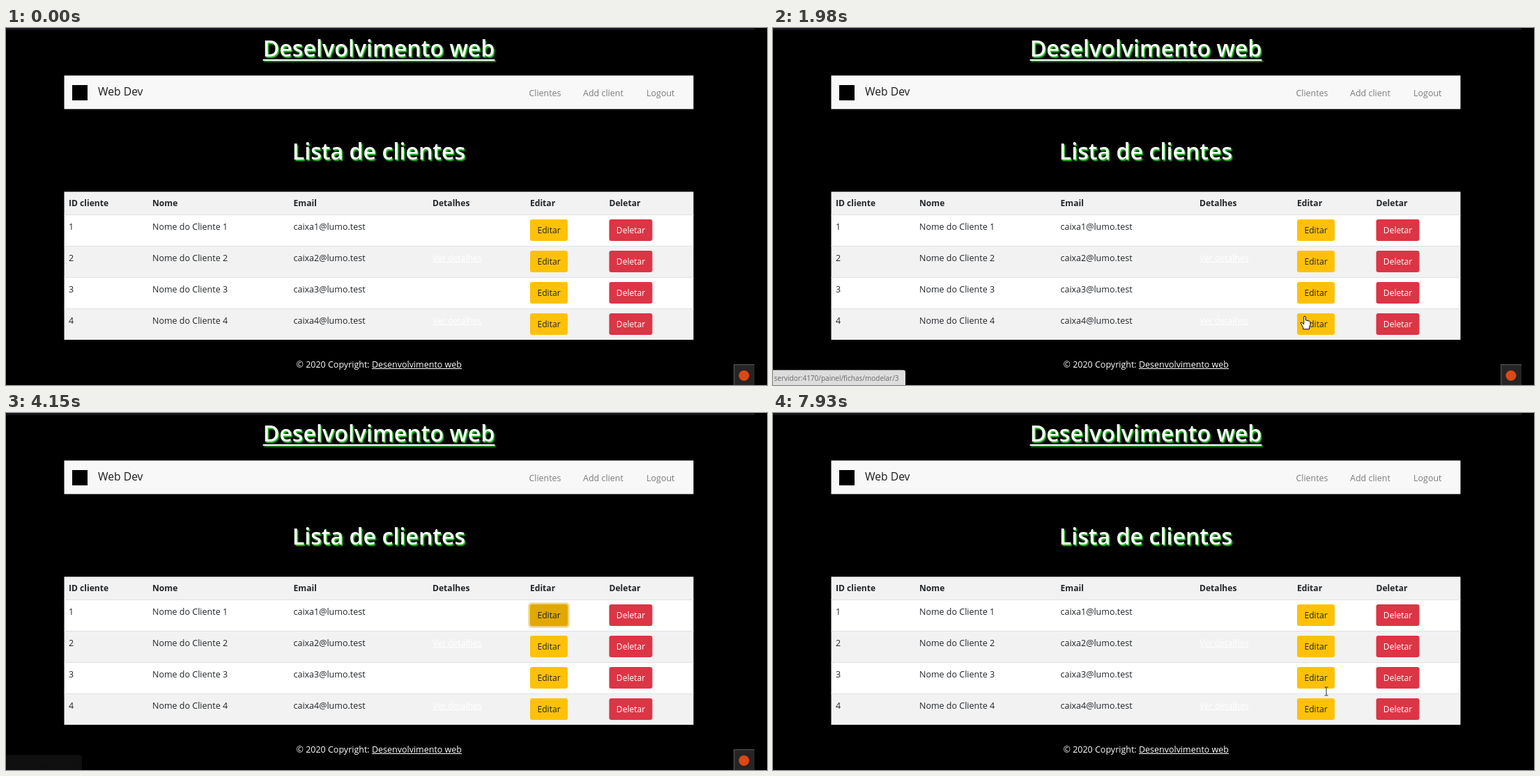
Animation, 1092 px wide and 513 px high, one loop 8000 ms. Source, as an HTML page with a canvas:

```html
<!DOCTYPE html>
<html lang="pt">
<head>
<meta charset="utf-8">
<title>Lista de clientes</title>
<style>
html, body { margin: 0; width: 100%; height: 100%; overflow: hidden; background: #000; }
canvas { display: block; }
</style>
</head>
<body>
<canvas id="stage" width="1092" height="513"></canvas>
<script>
const ctx = document.getElementById('stage').getContext('2d');
const FAMILY = '"Open Sans", "Noto Sans", sans-serif';
const LOOP = 8000, CLICK = 2740, FORM = 4830, BADGE = 5610, BACK = 7470;
const HOST = 'servidor:4170/painel';

// The screen refreshes in even ticks
const FIRST = 210, TICK = 76.43;
const tickOf = t => Math.floor((t - FIRST) / TICK);

// Pointer strokes: time, x, y at each turn
const strokes = [
  [[210, 1015, 497], [560, 900, 440], [1204, 884, 288], [1280, 861, 278], [1540, 774, 300],
   [1815, 771, 388], [1967, 763, 414], [2580, 780, 292], [2810, 772, 290], [3037, 511, 208],
   [3500, 62, 58], [3660, 62, 58]],
  [[3795, 689, 22], [3870, 689, 22]],
  [[6625, 736, 44], [7300, 110, 502], [7469, 110, 502]],
  [[7470, 140, 498], [7928, 794, 400], [LOOP, 794, 400]]
];

const LEFT = 83.5, WIDTH = 903;
const rowY = i => Math.round(268.2 + i * 44.8);
const fieldY = i => 222.5 + i * 50.5;

const title = { x: 369, y: 14, w: 332, h: 34, url: HOST, bar: 109 };
const editButton = i => ({
  x: 752, y: rowY(i) + 7, w: 54, h: 31, label: 'Editar', ink: '#212529', fill: '#ffc107', hot: '#e0a800',
  url: `${HOST}/fichas/modelar/${i + 1}`, bar: 190
});
const deleteButton = i => ({
  x: 865.5, y: rowY(i) + 7, w: 62, h: 31, label: 'Deletar', ink: '#fff', fill: '#dc3545', hot: '#c82333',
  url: `${HOST}/fichas/remover/${i + 1}`, bar: 186
});
const rows = [0, 1, 2, 3];
const listButtons = rows.flatMap(i => [editButton(i), deleteButton(i)]);
const save = { x: 77, y: 494, w: 56, h: 31, label: 'Salvar', ink: '#fff', fill: '#28a745', hot: '#218838' };
const fields = [
  ['ID:', '1'], ['Nome:', 'Nome do Cliente 1'], ['Email:', 'caixa1@lumo.test'],
  ['Telefone:', '+000412007300619'], ['Endereço:', 'Rua do Vumbe, 2700. Lagoim -XZ31']
];

const onForm = t => t >= FORM && t < BACK;
const inside = (p, r) => p.x >= r.x && p.x <= r.x + r.w && p.y >= r.y && p.y <= r.y + r.h;

function pointerAt(tick) {
  const t = FIRST + tick * TICK;
  const s = strokes.find(s => t >= s[0][0] && t <= s[s.length - 1][0]);
  if (!s) return null;
  const i = Math.max(1, s.findIndex(key => key[0] >= t));
  const [t0, x0, y0] = s[i - 1], [t1, x1, y1] = s[i];
  const u = (t - t0) / (t1 - t0);
  return { x: x0 + (x1 - x0) * u, y: y0 + (y1 - y0) * u };
}

function targetAt(tick) {
  const p = pointerAt(tick);
  const targets = onForm(FIRST + tick * TICK) ? [save] : [title, ...listButtons];
  return p && targets.find(r => inside(p, r));
}

function rect(x, y, w, h, color) {
  ctx.fillStyle = color;
  ctx.fillRect(x, y, w, h);
}

function round(x, y, w, h, r, color) {
  ctx.fillStyle = color;
  ctx.beginPath();
  ctx.roundRect(x, y, w, h, r);
  ctx.fill();
}

function text(str, x, y, size, color, weight = 400, align = 'left') {
  ctx.font = `${weight} ${size}px ${FAMILY}`;
  ctx.textAlign = align;
  ctx.fillStyle = color;
  ctx.fillText(str, x, Math.round(y));
  return ctx.measureText(str).width;
}

function link(str, x, y, size, color) {
  const w = text(str, x, y, size, color);
  rect(x, y + 1, w, 1, color);
}

function heading(str, cx, y, underline) {
  ctx.save();
  ctx.shadowColor = '#3d3';
  ctx.shadowBlur = 2;
  ctx.shadowOffsetX = ctx.shadowOffsetY = 1.5;
  const w = text(str, cx, y, 32.2, '#fff', 600, 'center');
  if (underline) rect(cx - w / 2, y + 4, w, 2, '#fff');
  ctx.restore();
}

function button(b, hot) {
  round(b.x, b.y, b.w, b.h, 3.2, hot ? b.hot : b.fill);
  text(b.label, b.x + b.w / 2, b.y + 20, 12.1, b.ink, 400, 'center');
}

function header(dx) {
  rect(0, 0, 1074, 3, '#15161d');
  heading('Deselvolvimento web', 535 + dx, 41, true);
  rect(LEFT + dx, 68.3, WIDTH, 48.2, '#f8f8f8');
  rect(95 + dx, 82, 22, 22, '#000');
  text('Web Dev', 132 + dx, 97, 15.7, '#1a1a1a');
  text('Clientes', 750.5 + dx, 98, 12.4, '#7c7c7c');
  text('Add client', 828 + dx, 98, 12.5, '#7c7c7c');
  text('Logout', 919 + dx, 98, 12.5, '#7c7c7c');
}

function badge(x) {
  rect(x, 483, 30, 30, '#484848');
  rect(x + 1.5, 484.5, 28.5, 28.5, '#252525');
  ctx.fillStyle = '#dd4814';
  ctx.beginPath();
  ctx.arc(x + 15, 499.5, 7.5, 0, Math.PI * 2);
  ctx.fill();
}

function listPage(t, hot) {
  header(0);
  heading('Lista de clientes', 535, 189);
  rect(LEFT, 235.3, WIDTH, 33, '#f2f2f2');
  const heads = { 'ID cliente': 90, Nome: 210, Email: 412.5, Detalhes: 612, Editar: 752, Deletar: 865.5 };
  for (const label in heads) text(label, heads[label], 256, 12.1, '#212529', 700);
  for (const i of rows) {
    const y = rowY(i), n = i + 1;
    rect(LEFT, y, WIDTH, 45, i % 2 ? '#f2f2f2' : '#fff');
    rect(LEFT, y, WIDTH, 1, '#dee2e6');
    text(n, heads['ID cliente'], y + 22, 12.5, '#212529');
    text('Nome do Cliente ' + n, heads.Nome, y + 22, 12.5, '#212529');
    text(`caixa${n}@lumo.test`, heads.Email, y + 22, 12.5, '#212529');
    link('Ver detalhes', heads.Detalhes, y + 22, 12.2, '#fff');
  }
  const pressed = t >= CLICK && t < FORM ? listButtons[0] : null;
  if (pressed) {
    const { x, y, w, h } = pressed;
    round(x - 2.6, y - 2.6, w + 5.2, h + 5.2, 5, 'rgba(222,170,12,.5)');
  }
  for (const b of listButtons) button(b, b === hot || b === pressed);
  const w = text('© 2020 Copyright: ', 416.5, 488, 12.5, '#fff');
  link('Desenvolvimento web', 416.5 + w, 488, 12.5, '#fff');
  if (t < FORM) badge(1044);
}

function triangle(cx, cy, dir, color) {
  ctx.fillStyle = color;
  ctx.beginPath();
  ctx.moveTo(cx - 3.5, cy - 2 * dir);
  ctx.lineTo(cx + 3.5, cy - 2 * dir);
  ctx.lineTo(cx, cy + 2 * dir);
  ctx.fill();
}

function formPage(t, hot) {
  header(-6.5);
  heading('Alterar cliente', 528.5, 189);
  fields.forEach(([label, value], i) => {
    const y = fieldY(i);
    text(label, 77, y - 5, 12.3, '#fff');
    round(77, y, WIDTH, 30.6, 3.2, '#ced4da');
    round(77.8, y + 0.8, WIDTH - 1.6, 29, 2.6, i ? '#fff' : '#e9ecef');
    text(value, 88, y + 20, 12.5, '#495057');
  });
  button(save, hot === save);
  rect(1062, 3, 12, 510, '#f1f1f1');
  rect(1062.5, 15, 11, 437.5, '#c6c6c6');
  triangle(1068, 9, -1, '#a8a8a8');
  triangle(1068, 507, 1, '#505050');
  if (t >= BADGE) badge(1032);
}

// Link address in the corner: fades over three ticks and leaves a faint trace
function statusBar(tick) {
  for (let age = 0; age < 14; age++) {
    const target = targetAt(tick - 1 - age);
    if (!target) continue;
    ctx.save();
    ctx.globalAlpha = 1 - 0.94 * (Math.min(age, 3) / 3) ** 2;
    round(0, 491.5, target.bar, 22, [0, 3, 0, 0], '#f8f8f8');
    text(target.url, 1.5, 507, 10, '#5a5a5a');
    ctx.restore();
    return;
  }
}

const ARROW = new Path2D('M0 0V12.6L2.9 10 4.9 14.7 7 13.8 5 9.2H9Z');
const HAND = new Path2D('M-1.3 1Q0-.8 1.3 1V6L6.5 7.2Q8 7.8 8 9.5V13L6.5 16V19H-2.3V16.5L-6 10Q-4.8 8.4-3 10.2L-1.3 11.8Z');
const BEAM = new Path2D('M-2.5-6H-.6L0-5.4 .6-6H2.5M0-5.4V5.4M-2.5 6H-.6L0 5.4 .6 6H2.5');

function pointer(t, tick) {
  const p = pointerAt(tick);
  if (!p) return;
  const overText = onForm(t)
    ? fields.some((_, i) => inside(p, { x: 77, y: fieldY(i), w: WIDTH, h: 30.6 }))
    : t >= BACK && inside(p, { x: LEFT, y: 235, w: WIDTH, h: 212 });
  ctx.save();
  ctx.translate(p.x, p.y);
  ctx.lineJoin = 'round';
  ctx.lineWidth = 1;
  if (overText) {
    ctx.strokeStyle = '#222';
    ctx.stroke(BEAM);
  } else {
    const shape = targetAt(tick) ? HAND : ARROW;
    ctx.fillStyle = '#fff';
    ctx.strokeStyle = '#000';
    ctx.fill(shape);
    ctx.stroke(shape);
  }
  ctx.restore();
}

function draw(t) {
  const tick = tickOf(t);
  const hot = targetAt(tick - 1); // hover colours lag one tick
  rect(0, 0, 1092, 513, '#000');
  if (onForm(t)) {
    formPage(t, hot);
  } else {
    listPage(t, hot);
    if (t < FORM) statusBar(tick);
  }
  pointer(t, tick);
}

const start = performance.now();
function frame() {
  draw((performance.now() - start) % LOOP);
  requestAnimationFrame(frame);
}
frame();
</script>
</body>
</html>
```
